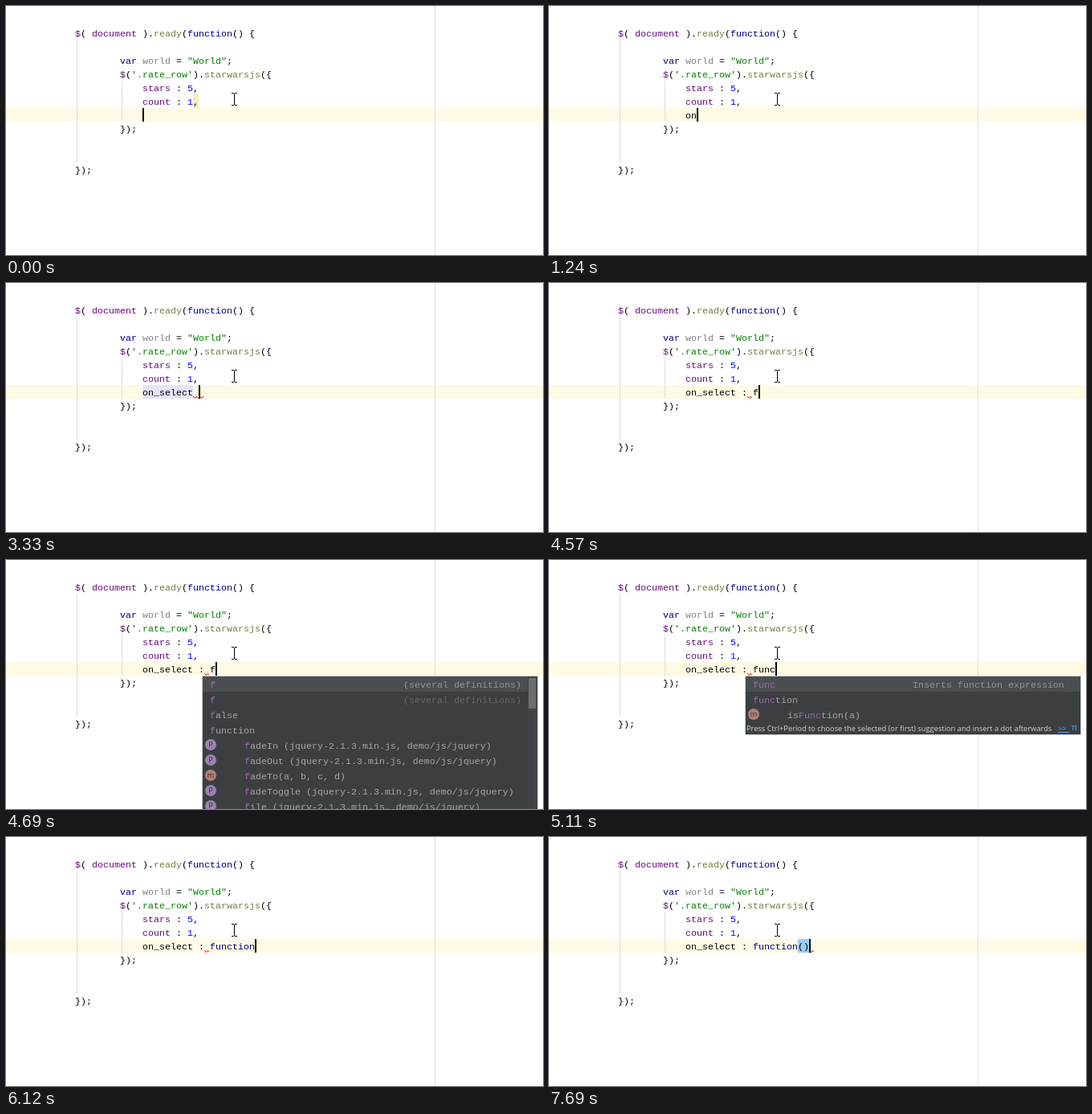
Animation, 669 px wide and 310 px high, one loop 8000 ms. Source, as an HTML page with a canvas:

```html
<!DOCTYPE html>
<html lang="en">
<head>
<meta charset="utf-8">
<title>Code editor</title>
<style>
html, body { margin: 0; width: 100%; height: 100%; overflow: hidden; background: #fff; }
#stage { position: absolute; left: 0; top: 0; width: 669px; height: 310px; overflow: hidden; }
canvas { position: absolute; left: 0; top: 0; }
#stage span { position: absolute; white-space: pre;
  font: 11.667px/17px "Liberation Mono", monospace; font-kerning: none; }
#stage span.hint { font: 9.3px/17px "Open Sans", sans-serif; }
#stage span.icon { font: 9px/17px "Open Sans", sans-serif; width: 14px; text-align: center; }
</style>
</head>
<body>
<div id="stage"><canvas id="c" width="669" height="310"></canvas><div id="code"></div><div id="live"></div></div>
<script>
const g = document.getElementById('c').getContext('2d');
const codeLayer = document.getElementById('code');
const live = document.getElementById('live');
const LOOP = 8000, CW = 7, LEFT = 170;
const NAVY = '#000080', PURPLE = '#660e7a', GREEN = '#008000', OLIVE = '#7a7a43',
      BLUE = '#0000ff', GREY = '#808080', BLACK = '#000';
const POP = { x: 244, y: 144, w: 419, row: 19, edge: '#c8c8c8', bg: '#3c3f41', sel: '#4b4e50',
              text: '#a4a6a7', match: '#a068b0', dim: '#66696b' };

function rect(x, y, w, h, color) {
  g.fillStyle = color;
  g.fillRect(x, y, w, h);
}

function put(layer, x, base, str, color, cls = '') {
  const s = document.createElement('span');
  s.textContent = str;
  s.className = cls;
  s.style.cssText = `left:${x}px;top:${base - 11}px;color:${color}`;
  layer.append(s);
}

// Parts are [text, colour]
function line(layer, x, base, parts) {
  for (const [str, color = BLACK] of parts) {
    put(layer, x, base, str, color);
    x += str.length * CW;
  }
}

function staticCode() {
  const row = (n, x, parts) => line(codeLayer, x, 38 + n * 17, parts);
  row(0, 86, [['$', PURPLE], ['( '], ['document', PURPLE], [' ).'], ['ready', OLIVE],
    ['('], ['function', NAVY], ['() {']]);
  row(2, 142, [['var', NAVY], [' '], ['world', GREY], [' = '], ['"World"', GREEN], [';']]);
  row(3, 142, [['$', PURPLE], ['('], ["'.rate_row'", GREEN], [').'], ['starwarsjs', OLIVE], ['({']]);
  row(4, 170, [['stars', PURPLE], [' : '], ['5', BLUE], [',']]);
  row(5, 170, [['count', PURPLE], [' : '], ['1', BLUE], [',']]);
  row(7, 142, [['});']]);
  row(10, 86, [['});']]);
}

// Popup rows: pre = text before the match, str = rest, note = right-hand text
const js = name => ({ icon: 'P', str: `${name} (jquery-2.1.3.min.js, demo/js/jquery)` });
const several = '(several definitions)';
const func = { str: 'func', note: 'Inserts function expression' };
const fn = { str: 'function' };
const isFn = { icon: 'm', pre: 'is', str: 'Function(a)' };
const LISTS = {
  all: [{ str: 'f', note: several }, { str: 'f', note: several }, { str: 'false' }, fn,
    js('fadeIn'), js('fadeOut'), { icon: 'm', str: 'fadeTo(a, b, c, d)' }, js('fadeToggle'), js('file')],
  mid: [fn, isFn, func],
  exact: [func, fn, isFn],
  last: [fn, isFn]
};

const FULL = 'on_select : function';
// t: start, n: typed characters, sq: [column, length] of the error wave, id: highlighted identifier length
const STEPS = [
  { t: 0, n: 0, comma: 1 },
  { t: 580, n: 0, comma: 1, off: 1 },
  { t: 860, n: 2, comma: 1 },
  { t: 1240, n: 2 },
  { t: 1380, n: 2, id: 2, sq: [2, 1] },
  { t: 1820, n: 3, id: 2, sq: [3, 1] },
  { t: 2100, n: 3, id: 3, sq: [3, 1] },
  { t: 2240, n: 4, id: 4, sq: [4, 1] },
  { t: 2380, n: 5, id: 5, sq: [5, 1] },
  { t: 2520, n: 6, id: 6, sq: [6, 1] },
  { t: 2790, n: 7, id: 7, sq: [7, 1] },
  { t: 3070, n: 8, id: 8, sq: [8, 1] },
  { t: 3200, n: 9, id: 9, sq: [9, 1] },
  { t: 3330, n: 10, id: 9, sq: [9, 2] },
  { t: 3740, n: 11, sq: [9, 2] },
  { t: 4040, n: 12, sq: [9, 2] },
  { t: 4320, n: 12, sq: [11, 1] },
  { t: 4570, n: 13, sq: [11, 1] },
  { t: 4690, n: 13, sq: [11, 1], list: 'all' },
  { t: 4840, n: 15, sq: [11, 1], list: 'mid' },
  { t: 5110, n: 16, sq: [11, 1], list: 'exact' },
  { t: 5420, n: 17, sq: [11, 1], list: 'last' },
  { t: 5570, n: 18, sq: [11, 1], list: 'last' },
  { t: 5850, n: 19, sq: [11, 1], list: 'last' },
  { t: 6120, n: 20, sq: [11, 1] },
  { t: 6260, n: 20, paren: 1, sq: [11, 1] },
  { t: 6540, n: 20, paren: 1, sq: [22, 1] },
  { t: 7550, n: 20, paren: 2, sq: [22, 1] },
  { t: 7690, n: 20, paren: 2, sq: [22, 1], pair: 1 }
];

function wave([col, len]) {
  const x = LEFT + col * CW;
  for (let i = 0; i < len * CW - 1; i++) rect(x + i, 143 - Math.abs(i % 4 - 2), 1, 1, '#ff0000');
}

function mouse() {
  rect(284, 109, 1, 14, BLACK);
  for (const y of [108, 123]) {
    rect(281, y, 3, 1, BLACK);
    rect(285, y, 3, 1, BLACK);
  }
}

function popup(key, typed) {
  const rows = LISTS[key], long = key === 'all', { x, y, w, row } = POP;
  const h = rows.length * row + (long ? 1 : 17);
  rect(x, y, w, h, POP.edge);
  rect(x + 1, y + 1, w - 2, h - 2, POP.bg);
  rect(x + 1, y + 1, w - 2, row, POP.sel);
  rows.forEach(({ icon, pre = '', str, note }, i) => {
    const base = 159 + i * row;
    if (icon) {
      g.fillStyle = icon === 'P' ? '#9a83ad' : '#b07f76';
      g.beginPath();
      g.arc(255, base - 5, 7, 0, 7);
      g.fill();
      put(live, 248, base - 3, icon, '#352e36', 'icon');
    }
    line(live, icon ? 297 : 254, base,
      [[pre, POP.text], [str.slice(0, typed), POP.match], [str.slice(typed), POP.text]]);
    if (note) put(live, 642 - note.length * CW, base, note, long && i ? POP.dim : '#929495');
  });
  if (long) {
    rect(650, y + 1, 12, h, '#424547');
    rect(651, 147, 9, 38, '#6b6d6e');
  } else {
    const base = y + h - 6;
    put(live, 246, base, 'Press Ctrl+Period to choose the selected (or first) suggestion and insert a dot afterwards', '#d0d2d3', 'hint');
    put(live, 634, base, '>>', '#589df6', 'hint');
    rect(634, base + 2, 14, 1, '#589df6');
    put(live, 651, base, 'π', '#4a9fd8');
  }
}

function draw(s) {
  rect(0, 0, 669, 310, '#fff');
  rect(0, 127, 669, 17, '#fffae3');
  rect(534, 0, 1, 310, '#e0e0e0');
  rect(88, 42, 1, 153, '#dedede');
  rect(144, 93, 1, 51, '#dedede');
  if (s.comma) rect(233, 110, 7, 17, '#f6ebbc');
  if (s.id) rect(LEFT, 127, s.id * CW, 17, '#e4e4ff');
  if (s.pair) rect(310, 127, 14, 17, '#99ccff');
  if (s.sq) wave(s.sq);
  mouse();

  live.textContent = '';
  const str = FULL.slice(0, s.n), done = s.n === FULL.length;
  line(live, LEFT, 140, done
    ? [[str.slice(0, 12)], [str.slice(12), NAVY], [s.paren ? '()' : '']]
    : [[str]]);
  if (s.list) popup(s.list, s.n - 12);
  if (!s.off) rect(LEFT + (s.n + (s.paren || 0)) * CW, 127, 2, 17, BLACK);
}

let shown;
const start = performance.now();
function tick() {
  const t = (performance.now() - start) % LOOP;
  const step = STEPS.findLast(s => s.t <= t);
  if (step !== shown) draw(shown = step);
  requestAnimationFrame(tick);
}
staticCode();
tick();
</script>
</body>
</html>
```
